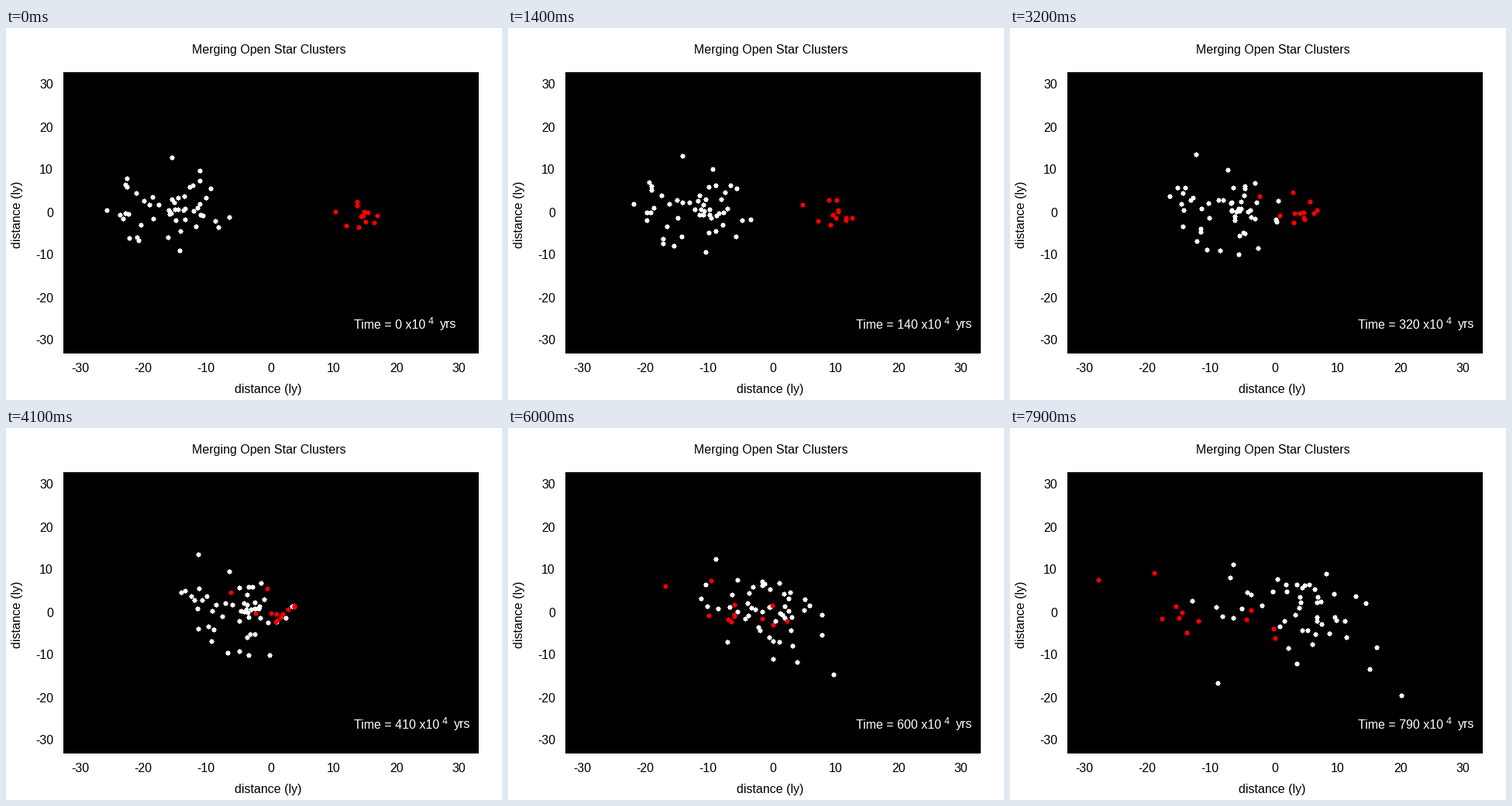
These frames come from a looping animation (640x480 px, 8000 ms). A matplotlib script:

```python
import numpy as np
import matplotlib.pyplot as plt
from matplotlib.animation import FuncAnimation
from matplotlib.collections import PolyCollection
from matplotlib.patches import Rectangle

W, H, DPI = 640, 480, 80
FRAMES, INTERVAL = 80, 100
FONT_PX = 16
MEET, END = 4.0, 7.9  # seconds: clusters meet, loop ends

plt.rcParams["font.family"] = "Liberation Sans"
rng = np.random.RandomState(4)


def to_px(p):
    """Light years to stage pixels."""
    return np.asarray(p) * (8.1, -5.5) + (342, 238)


def bend(t, width=0.3):
    """Smooth ramp: flat until the clusters meet, then rising to 1 at the end."""
    def ramp(s):
        return width * np.log1p(np.exp((s - MEET) / width))
    return ramp(t) / ramp(END)


def travel(path, t):
    """Straight flight from start to meeting point, then deflected to the end."""
    start, meet, end = np.moveaxis(np.asarray(path, float), -2, 0)
    drift = (meet - start) / MEET
    return start + drift * t + (end - start - drift * END) * bend(t)


class Cluster:
    """Stars circling a moving centre, scattered by the encounter, plus strays."""

    def __init__(self, color, count, radius, center, scatter, strays):
        self.center, self.strays = center, strays
        self.r = radius * np.linspace(0.04, 1, count)
        self.angle = rng.uniform(0, 2 * np.pi, count)
        self.spin = rng.uniform(-2, 2, count) / (1 + self.r)
        self.kick = rng.uniform(-1, 1, (count, 2)) * scatter
        self.dots = PolyCollection([], facecolors=color, edgecolors="none",
                                   linewidths=0, antialiaseds=False, zorder=2)

    def place(self, t):
        a = self.angle + self.spin * t
        orbit = self.r[:, None] * np.column_stack([np.cos(a), np.sin(a)])
        swarm = travel(self.center, t) + orbit + self.kick * bend(t)
        stars = np.concatenate([swarm, travel(self.strays, t)])
        self.dots.set_verts(np.rint(to_px(stars))[:, None, :] + STAR)


# Star outline: a 5 px square with a 1 px tip on each side.
side = np.array([(-2.5, -2.5), (-0.5, -2.5), (-0.5, -3.5), (0.5, -3.5), (0.5, -2.5)])
turn = np.array([(0, 1), (-1, 0)])
STAR = np.concatenate([side @ np.linalg.matrix_power(turn, k) for k in range(4)])

clusters = [
    Cluster("white", 46, 10.5, [(-15.7, 0.8), (-4.8, -0.2), (6.5, -0.7)], (8, 4.5),
            [[(-15.8, 12.9), (-11.8, 13.8), (-6.7, 11.3)],
             [(-8.4, -3.5), (-1.4, -9.5), (20.1, -19.5)],
             [(-19.4, 1.8), (-5.3, 3.3), (-9.1, -16.5)],
             [(-6.7, -1.1), (2.2, -2.5), (-13.2, 2.7)]]),
    Cluster("red", 8, 3.0, [(15.3, 0.0), (1.2, 0.0), (-9.8, -0.5)], (8, 4.5),
            [[(10.2, 0.2), (-5.6, 4.7), (-28.1, 7.6)],
             [(13.7, 1.6), (0.1, 5.6), (-19.3, 9.3)],
             [(12.0, -3.1), (-2.0, 0.0), (-18.0, -1.5)],
             [(13.9, -3.5), (0.2, -2.0), (-0.2, -3.8)]]),
]

fig = plt.figure(figsize=(W / DPI, H / DPI), dpi=DPI, facecolor="white")
ax = fig.add_axes([0, 0, 1, 1])
ax.set_xlim(-0.5, W - 0.5)
ax.set_ylim(H - 0.5, -0.5)
ax.axis("off")
ax.add_patch(Rectangle((73.5, 56.5), 536, 363, color="black", lw=0))
for cluster in clusters:
    ax.add_collection(cluster.dots, autolim=False)


def label(x, y, text, ha="center", color="black", px=FONT_PX, **kw):
    return ax.text(x, y, text, ha=ha, va="baseline", color=color,
                   fontsize=px * 72 / DPI, **kw)


label(338.5, 33, "Merging Open Star Clusters")
label(338, 471, "distance (ly)")
label(19, 240.5, "distance (ly)", rotation=90, rotation_mode="anchor")
for value in range(-30, 31, 10):
    x, y = to_px((value, value))
    minus = 2.8 if value < 0 else 0
    label(x - 0.7 - minus, 443, str(value))
    label(60.5, y + 5, str(value), ha="right")

clock = label(448.7, 388, "", ha="left", color="white")
power = label(0, 382, "4", ha="left", color="white", px=0.8 * FONT_PX)
unit = label(0, 387, "yrs", ha="left", color="white")


def draw(frame):
    for cluster in clusters:
        cluster.place(frame * INTERVAL / 1000)
    years = str(frame * 10)
    shift = (len(years) - 1) * 0.556 * FONT_PX
    clock.set_text(f"Time = {years} x10")
    power.set_x(544.7 + shift)
    unit.set_x(559.8 + shift)
    return [c.dots for c in clusters] + [clock, power, unit]


anim = FuncAnimation(fig, draw, frames=FRAMES, interval=INTERVAL,
                     repeat=True, repeat_delay=0, blit=False)
plt.show()
```
